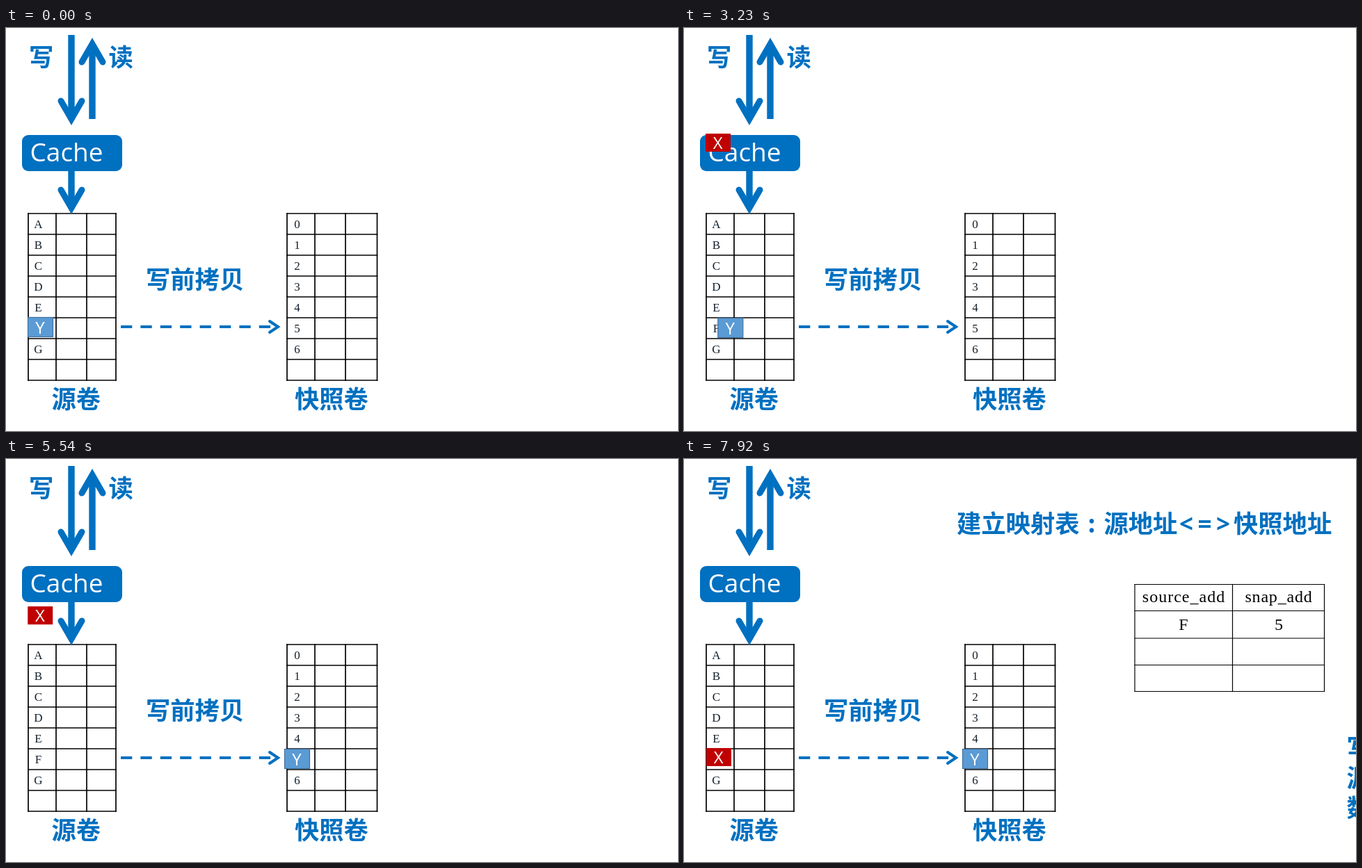
Animation, 966 px wide and 580 px high, one loop 8000 ms. Source, as an HTML page with a canvas:

```html
<!DOCTYPE html>
<html lang="zh-CN">
<head>
<meta charset="utf-8">
<title>写前拷贝</title>
<style>
  html, body { margin: 0; width: 100%; height: 100%; overflow: hidden; background: #fff; }
  canvas { display: block; }
</style>
</head>
<body>
<canvas id="stage" width="966" height="580"></canvas>
<script>
const ctx = document.getElementById('stage').getContext('2d');
const LOOP = 8000;
const BLUE = '#0070c0';
const CJK = 'bold 35.3px "Noto Sans CJK SC", "Noto Sans CJK", sans-serif';
const SANS = '"Open Sans", "Noto Sans", sans-serif';
const SERIF = '"Liberation Serif", "Noto Serif", serif';

// Bursts of picture changes: first step, last step, number of steps
const BURSTS = [
  [850, 1080, 4], [1540, 2330, 11], [2390, 2470, 2], [2940, 3700, 11],
  [3800, 4590, 11], [4650, 5440, 11], [5540, 6280, 11],
  [6370, 7050, 10], [7150, 7320, 3], [7920, 7920, 1]
];

function snap(t) {
  let last = 0;
  for (const [from, to, n] of BURSTS) {
    for (let i = 0; i < n; i++) {
      const step = from + (to - from) * i / Math.max(1, n - 1);
      if (step <= t) last = step;
    }
  }
  return last;
}

const progress = (t, start, length) => Math.min(1, Math.max(0, (t - start) / length));
const ease = p => (1 - Math.cos(Math.PI * p)) / 2;
const mix = (a, b, p) => a + (b - a) * p;

function text(str, x, y, font, color, align = 'left', spacing = 0) {
  ctx.font = font;
  ctx.fillStyle = color;
  ctx.textAlign = align;
  ctx.letterSpacing = spacing + 'px';
  ctx.fillText(str, x, y);
}

// Blue heading, placed by the vertical middle of its line
function heading(str, x, middle, align) {
  text(str, x, middle + 13.3, CJK, BLUE, align);
}

function line(points, width) {
  ctx.lineWidth = width;
  ctx.beginPath();
  for (const [x, y] of points) ctx.lineTo(x, y);
  ctx.stroke();
}

function grid(xs, ys, width) {
  ctx.strokeStyle = '#000';
  ctx.lineCap = 'square';
  for (const x of xs) line([[x, ys[0]], [x, ys[ys.length - 1]]], width);
  for (const y of ys) line([[xs[0], y], [xs[xs.length - 1], y]], width);
}

function volume(xs, labels) {
  const ys = Array.from({ length: 9 }, (_, i) => 267 + 30 * i);
  grid(xs, ys, 1.7);
  [...labels].forEach((c, i) =>
    text(c, xs[0] + 14.5, 288 + 30 * i, '17px ' + SERIF, '#14202c', 'center'));
}

function thickArrow(x, from, vertex) {
  const back = vertex + Math.sign(from - vertex) * 26;
  ctx.strokeStyle = BLUE;
  ctx.lineCap = 'butt';
  line([[x, from], [x, vertex]], 9.4);
  ctx.lineCap = 'round';
  line([[x - 15, back], [x, vertex], [x + 15, back]], 9);
}

function dashedArrow() {
  ctx.strokeStyle = BLUE;
  ctx.lineCap = 'butt';
  ctx.setLineDash([16.3, 12.1]);
  line([[165, 430], [391, 430]], 4);
  ctx.setLineDash([]);
  ctx.lineCap = 'round';
  line([[379, 422], [391, 430], [379, 438]], 4);
}

function cacheBox() {
  ctx.fillStyle = BLUE;
  ctx.beginPath();
  ctx.roundRect(23, 154, 144, 52, 9);
  ctx.fill();
  text('Cache', 34.5, 192, '37px ' + SANS, '#fff');
}

function blockY(t) {
  const p = ease(progress(t, 2890, 2000));
  const x = mix(31.5, 400.5, p);
  const y = p > 0 ? 417.5 : 416.5;
  ctx.fillStyle = '#5b9bd5';
  ctx.fillRect(x, y, 36, 28);
  ctx.strokeStyle = '#41719c';
  ctx.lineWidth = 1.2;
  ctx.strokeRect(x, y, 36, 28);
  text('Y', x + 17.5, y + 23, '24px ' + SANS, '#fff', 'center');
}

function blockX(t) {
  const enter = progress(t, 570, 500);
  const toCache = ease(progress(t, 1460, 1000));
  const toDisk = ease(progress(t, 4965, 1815));
  const x = 31 + toDisk;
  const y = mix(-117, 65, enter) + 87 * toCache + 264 * toDisk;
  ctx.fillStyle = '#c00000';
  ctx.fillRect(x, y, 36, 26);
  text('X', x + 17.7, y + 22, '24px ' + SANS, '#fff', 'center');
}

function mapping(t) {
  const left = 1 - progress(t, 6778, 500);
  if (left === 1) return;

  ctx.save();
  ctx.translate(574 * left, 0);
  heading('建立映射表', 392, 93);
  heading(':', 586, 93, 'center');
  heading('源地址', 603.5, 93);
  text('<=>', 712, 106, 'bold 35px ' + SANS, BLUE, 'left', 6.5);
  heading('快照地址', 790, 93);
  ctx.restore();

  ctx.save();
  ctx.translate(318 * left, 0);
  grid([648, 788.5, 920.5], [180.5, 218.5, 258, 296.5, 334.5], 1.2);
  const font = '24px ' + SERIF;
  text('source_add', 718.5, 206, font, '#000', 'center', 1);
  text('snap_add', 855, 206, font, '#000', 'center', 0.8);
  text('F', 718, 246, font, '#000', 'center');
  text('5', 855, 246, font, '#000', 'center');
  ctx.restore();
}

function draw(t) {
  ctx.fillStyle = '#fff';
  ctx.fillRect(0, 0, 966, 580);

  thickArrow(94, 10, 131);
  thickArrow(124, 131, 23);
  heading('写', 33, 42);
  heading('读', 147.5, 42);
  cacheBox();

  volume([32, 72, 116, 158], 'ABCDEFG');
  volume([404, 444, 488, 533.5], '0123456');
  thickArrow(94, 206, 259);
  heading('源卷', 65.5, 534);
  heading('快照卷', 415, 534);
  heading('写前拷贝', 201, 362);

  blockY(t);
  dashedArrow();
  blockX(t);
  mapping(t);

  if (t >= 7920) {
    ['写', '源', '数'].forEach((c, i) => heading(c, 952.5, 415.5 + 43 * i));
  }
}

function tick() {
  draw(snap(performance.now() % LOOP));
  requestAnimationFrame(tick);
}
tick();
</script>
</body>
</html>
```
